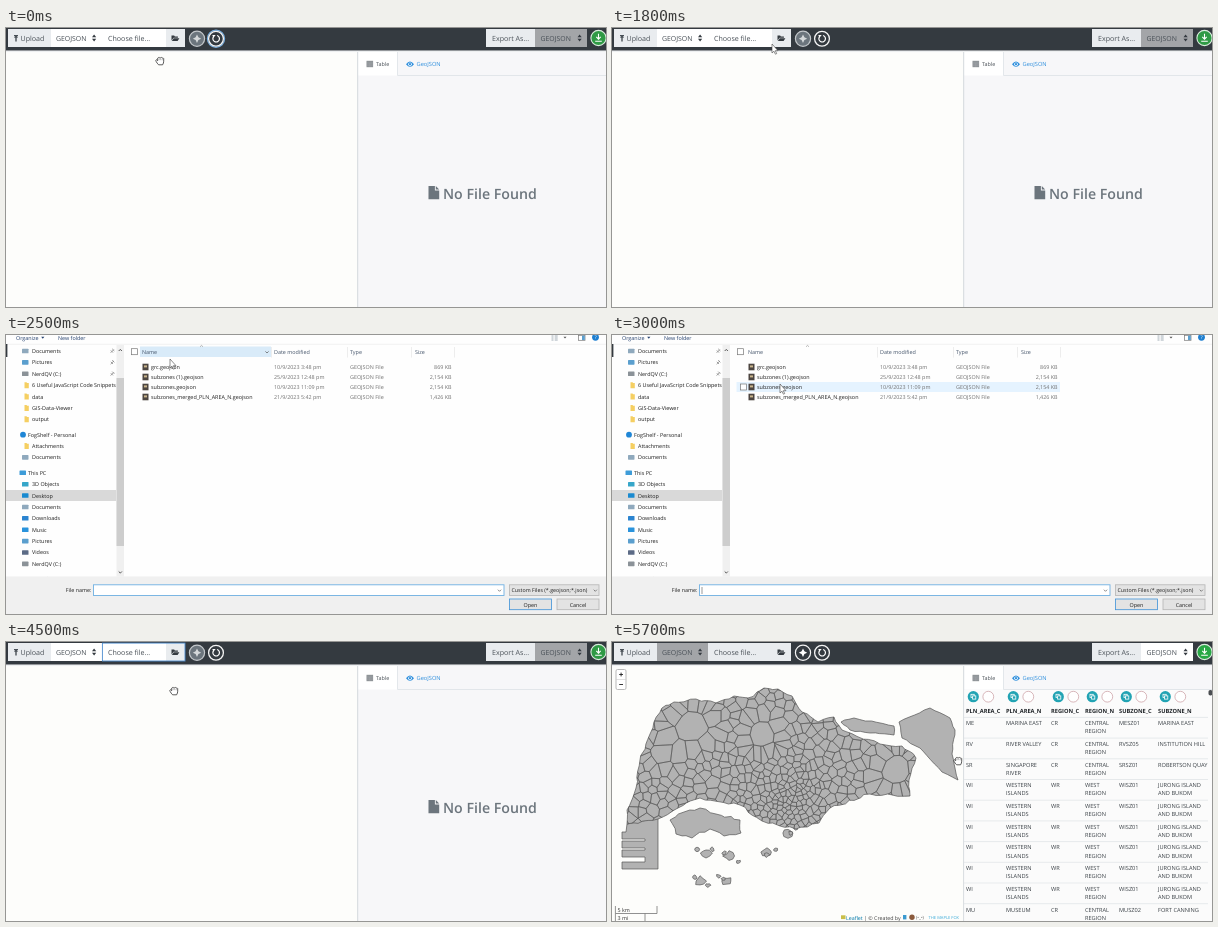
These frames come from a looping animation (600 px wide and 279 px high, 5.8 s). An HTML page:

```html
<!DOCTYPE html>
<html lang="en">
<head>
<meta charset="utf-8">
<title>GeoJSON viewer</title>
<style>
html, body { margin: 0; width: 100%; height: 100%; overflow: hidden; background: #fff; }
svg { display: block; width: 100vw; height: 100vh; }
text { font-family: "Open Sans", "Noto Sans", sans-serif; white-space: pre; text-rendering: geometricPrecision; }
</style>
</head>
<body>
<svg id="stage" viewBox="0 0 600 279" xmlns="http://www.w3.org/2000/svg"></svg>
<script>
const LOOP = 5800, STEP = 100;
const OPEN_AT = 2200, PICK_AT = 3200, CLOSE_AT = 3500, LOAD_AT = 5000;

const text = (x, y, s, size, fill = '#495057', more = '') =>
  `<text x="${x}" y="${y}" font-size="${size}" fill="${fill}" ${more}>${s}</text>`;
const rect = (x, y, w, h, fill, more = '') =>
  `<rect x="${x}" y="${y}" width="${w}" height="${h}" fill="${fill}" ${more}/>`;
const disc = (x, y, r, fill, more = '') =>
  `<circle cx="${x}" cy="${y}" r="${r}" fill="${fill}" ${more}/>`;
const path = (d, fill, more = '') => `<path d="${d}" fill="${fill}" ${more}/>`;
const line = (d, color, w = 1, more = '') => path(d, 'none', `stroke="${color}" stroke-width="${w}" ${more}`);
const group = (id, body) => `<g id="${id}">${body}</g>`;

// ---------- toolbar ----------
const carets = x => path(`M${x} 9.2l2.1 -2.6 2.1 2.6zM${x} 10.8l2.1 2.6 2.1 -2.6z`, '#343a40');

function toolbar() {
  return rect(0, 0, 600, 22.5, '#343a40') +
    rect(2, 1, 43, 18, '#e9ecef') +
    path('M8 7h4v1.2h-4zM10 7.2l2 2.6h-1.3v3.6h-1.4v-3.6h-1.3z', '#495057') +
    text(14.5, 13, 'Upload', 7.1) +
    rect(45, 1, 51, 18, '#fff', 'id="inType"') + text(50, 13, 'GEOJSON', 6.9) + carets(86) +
    rect(96, 1, 64, 18, '#fff', 'id="inFile"') + text(102, 13, 'Choose file...', 7.1) +
    rect(160, 1, 19, 18, '#e9ecef') +
    path('M165.5 12.5v-5h2.6l.8 .9h3v1.4h-4.3zM165.8 13l2-2.8h5.6l-1.8 2.8z', '#343a40') +
    rect(96.4, 1.1, 82.6, 17.9, 'none', 'id="focus" stroke="#4f8fd0" stroke-width=".9"') +
    disc(191, 10.7, 7.6, '#6c757d', 'id="compass" stroke="#c3c7ca" stroke-width="1.2"') +
    path('M191 6.5l1.4 2.8 2.8 1.4-2.8 1.4-1.4 2.8-1.4-2.8-2.8-1.4 2.8-1.4z', '#d5d8da', 'id="needle"') +
    disc(210, 10.7, 8.6, 'none', 'id="glow" stroke="#77aee0" stroke-width="1.2"') +
    disc(210, 10.7, 7.4, '#343a40', 'stroke="#f4f4f4" stroke-width="1.3"') +
    line('M207.6 8.6a3.3 3.3 0 1 0 3.4-1.1', '#fff', 1.2) + path('M206.3 6.9l3.4 .1-2.3 2.7z', '#fff') +
    rect(480, 1, 49, 18, '#e9ecef') + text(486, 13, 'Export As...', 7.1) +
    rect(529, 1, 52, 18, '#a3a5a8', 'id="outType"') + text(534.5, 13, 'GEOJSON', 6.9) + carets(571.5) +
    disc(592.5, 10, 7.6, '#2f9a45', 'id="save" stroke="#d8ecdc" stroke-width="1.1"') +
    line('M592.5 5.8v5M590.3 8.8l2.2 2.3 2.2-2.3M589.2 13.3h6.6', '#fff', 1.1);
}

function panels() {
  return rect(0, 22.5, 600, 256.5, '#fdfdfb') + rect(0, 22.5, 600, 1.6, '#eef0f1') +
    rect(352, 24, 248, 255, '#f7f7f9') + rect(352, 24, 39.5, 23.5, '#fff') +
    line('M351.7 24V279', '#d3d8dc') + line('M391.5 24V47.5H600', '#dee2e6', .8) +
    rect(360.5, 32.8, 6.6, 6.4, '#8f9498') + line('M360.5 35h6.6M360.5 37.1h6.6M363.8 35v4', '#a9adb0', .4) +
    text(370, 38.2, 'Table', 5.4) +
    path('M400 36.2q4-5.2 8 0q-4 5.2-8 0z', '#2f8fdd') + disc(404, 36.2, 1.8, '#fff') + disc(404, 36.2, 1.1, '#2f8fdd') +
    text(410.5, 38.2, 'GeoJSON', 5.7, '#2f8fdd');
}

const emptyNote = () =>
  path('M422.5 158h6.4v4.4h4.3v8.8h-10.7zM429.8 158l3.4 3.5h-3.4z', '#6c757d') +
  text(437, 171, 'No File Found', 14.2, '#6c757d', 'font-weight="600"');

// ---------- file dialog ----------
const INK = '#1e1e1e', DIM = '#707070', FS = 5.4;
const ROW_TOP = 27, ROW_H = 10;

// sections of the tree; a leading * marks a section root
const tree = [
  ['Documents', 'Pictures', 'NerdQV (C:)', '6 Useful JavaScript Code Snippets', 'data', 'GIS-Data-Viewer', 'output'],
  ['*FogShelf - Personal', 'Attachments', 'Documents'],
  ['*This PC', '3D Objects', 'Desktop', 'Documents', 'Downloads', 'Music', 'Pictures', 'Videos', 'NerdQV (C:)'],
  ['*Network']
];
const icons = {
  Documents: '#8fa9bd', Pictures: '#5b9fce', 'NerdQV (C:)': '#8b9298', 'This PC': '#3e9cd8', Network: '#3e9cd8',
  '3D Objects': '#36a6c9', Desktop: '#1a8ad0', Downloads: '#2b84d0', Music: '#2a93dc', Videos: '#5c6b86'
};
const files = [
  ['grc.geojson', '10/9/2023 3:48 pm', '869 KB'],
  ['subzones (1).geojson', '25/9/2023 12:48 pm', '2,154 KB'],
  ['subzones.geojson', '10/9/2023 11:09 pm', '2,154 KB'],
  ['subzones_merged_PLN_AREA_N.geojson', '21/9/2023 5:42 pm', '1,426 KB']
];

function treeItem(item, y) {
  const root = item[0] === '*', label = item.replace('*', ''), x = root ? 13.5 : 16, color = icons[label];
  const icon = color ? rect(x, y - 2.3, 6.5, 4.6, color, 'rx=".6"')
    : root ? disc(x + 3.5, y, 2.9, '#1f86d6')
    : path(`M18.5 ${y - 3}h2l.7 .8h1.6v5.2h-4.3z`, '#f5cf62');
  return icon + text(root ? 22 : 26, y + 2, label, FS, INK);
}

function treePane() {
  let n = 0;
  const items = tree.map((section, s) => section.map(item => treeItem(item, 16 + 11.38 * n++ + 4 * s)).join(''));
  const pins = [0, 1, 2].map(i => line(`M104.6 ${17.8 + 11.4 * i}l3.2-3.2m-1.6-.8l2.2 2.2m-3.6-.6l2.2 2.2`, '#777', .7));
  return rect(0, 155, 110, 11, '#d9d9d9') + items.join('') + pins.join('') +
    rect(110.5, 10, 7.5, 231.5, '#f0f0f0') + rect(110.5, 43, 7.5, 168, '#cdcdcd') +
    line('M112.7 16l1.6-1.6 1.6 1.6M112.7 236.5l1.6 1.6 1.6-1.6', '#444', .9);
}

const fileRow = ([name, date, size], i) => {
  const y = ROW_TOP + ROW_H * i + 5;
  return rect(136.5, y - 3.3, 6, 6.6, '#4c4540') + rect(138, y - 1.6, 3, 2, '#c8b48c') +
    text(145, y + 1.8, name, FS, INK) + text(268, y + 1.8, date, FS, DIM) +
    text(344, y + 1.8, 'GEOJSON File', FS, DIM) + text(445.5, y + 1.8, size, FS, DIM, 'text-anchor="end"');
};

const chevron = (x, y) => line(`M${x - 1.6} ${y - .8}l1.6 1.6 1.6-1.6`, '#555', .7);
const checkbox = (x, y) => rect(x, y, 6, 6, '#fff', 'stroke="#777" stroke-width=".7"');
const button = (x, label, edge) => rect(x, 264, 42, 10.7, '#e3e3e3', `stroke="${edge}" stroke-width=".8"`) +
  text(x + 21, 271.5, label, FS, INK, 'text-anchor="middle"');

function dialog() {
  return rect(0, 0, 600, 279, '#fefefe') + line('M0 9.3H600', '#ececec', .7) +
    rect(0, 9, 1.4, 13, '#343a40') +
    text(10, 4.8, 'Organize', FS, '#24406e') + path('M35.2 1.8h3.2l-1.6 1.9z', '#24406e') +
    text(52, 4.8, 'New folder', FS, '#24406e') +
    line('M545.5 1h2m1.2 0h3M545.5 3h2m1.2 0h3M545.5 5h2m1.2 0h3', '#8a97a3', .8) + path('M557.5 1.8h3l-1.5 1.8z', '#555') +
    rect(572.5, .3, 6.5, 5, '#fff', 'stroke="#777" stroke-width=".7"') + rect(576, .6, 2.8, 4.4, '#5b9fce') +
    disc(589.5, 2.3, 3.4, '#1e7fd0') + text(589.5, 4.3, '?', 5, '#fff', 'text-anchor="middle"') +
    treePane() +
    rect(134, 11.5, 131, 10.5, '#d9ebf9', 'id="headHover"') +
    rect(124.5, 47, 323.5, ROW_H, '#e5f3ff', 'id="rowHover"') +
    checkbox(125.5, 13.7) + group('rowCheck', checkbox(128.5, 49)) +
    line('M265.5 12V22.5M341.5 12V22.5M405.5 12V22.5M448.5 12V22.5', '#e6e6e6', .7) +
    line('M194 11.8l1.5-1.4 1.5 1.4', '#888', .6) + group('headChevron', chevron(261, 17.2)) +
    [['Name', 136], ['Date modified', 268], ['Type', 344], ['Size', 409]]
      .map(([s, x]) => text(x, 18.8, s, FS, '#44546a')).join('') +
    files.map(fileRow).join('') +
    rect(0, 241.5, 600, 37.5, '#f0f0f0') +
    text(85.5, 257.3, 'File name:', FS, INK, 'text-anchor="end"') +
    rect(87.5, 249.8, 410.5, 10.7, '#fff', 'stroke="#6fb0e2" stroke-width=".9"') + chevron(493.5, 255.5) +
    text(90, 257.3, 'subzones.geojson', FS, INK, 'id="picked"') + line('M90 252V259', '#333', .5, 'id="caret"') +
    rect(503.5, 249.8, 89.5, 10.7, '#e3e3e3', 'stroke="#b5b5b5" stroke-width=".8"') +
    text(505.5, 257.3, 'Custom Files (*.geojson;*.json)', 5.3, INK) + chevron(589.3, 255.5) +
    button(503.5, 'Open', '#3f92d8') + button(551, 'Cancel', '#b5b5b5');
}

// ---------- map ----------
let seed = 29;
const rnd = () => (seed = (seed * 16807) % 2147483647) / 2147483647;
const wobble = a => (rnd() - .5) * 2 * a;
const join = pts => 'M' + pts.map(p => p.map(n => n.toFixed(1)).join(' ')).join('L') + 'Z';

// roughens the straight edges between a few key points
function coast(keys, rough = 1.3) {
  const pts = keys.split(' ').map(p => p.split(',').map(Number));
  return join(pts.flatMap(([x, y], i) => {
    const [u, v] = pts[(i + 1) % pts.length], n = Math.ceil(Math.hypot(u - x, v - y) / 6);
    return Array.from({ length: n }, (_, k) =>
      [x + (u - x) * k / n + (k && wobble(rough)), y + (v - y) * k / n + (k && wobble(rough))]);
  }));
}

const blob = (x, y, r) => join(Array.from({ length: 8 }, (_, i) => {
  const a = i * Math.PI / 4, d = r * (.6 + rnd() * .7);
  return [x + d * 1.2 * Math.cos(a), y + d * Math.sin(a)];
}));

const mainland = '28,118 38,92 50,66 62,60 84,57 104,61 122,54 136,56 152,46 166,47 180,54 190,70 206,80 222,75 ' +
  '230,88 268,102 290,104 304,116 297,138 298,154 258,152 218,166 207,181 184,187 150,179 128,163 88,156 66,166 46,177 15,182 15,168 24,146';
const jurong = '72,170 88,166 104,172 128,178 129,191 112,194 98,187 80,196 64,192 58,178';
const tekong = '287,80 318,66 338,76 343,88 340,112 346,138 330,130 308,106 290,96';
const ubin = '229,80 242,76 282,84 282,93 258,91 238,88';

// a block of land with three docks cut into its western side
const docks = 'M15 182L46 176V227H10V220' + [213, 204, 195].map(y => `H33V${y + 2}H10V${y - 5}`).join('') + 'H14Z';

function islets() {
  const groups = [[94, 211], [117, 214], [88, 239], [115, 239], [155, 210], [176, 191]];
  return groups.flatMap(([x, y]) => [blob(x, y, 4.2), ...[1, 2].map(() => blob(x + wobble(12), y + wobble(6), 2))]);
}

// spacing shrinks towards the city centre; a few districts stay large
function districtSeeds() {
  const list = [[80, 84, 38], [50, 112, 24], [150, 92, 30], [284, 128, 34]];
  for (let i = 0; i < 7000; i++) {
    const x = 8 + rnd() * 302, y = 42 + rnd() * 150;
    const r = Math.min(8, 2.4 + Math.hypot(x - 176, y - 164) * .075) * (.65 + rnd() * .8);
    if (list.every(s => Math.hypot(x - s[0], y - s[1]) > Math.max(r, s[2] * .72))) list.push([x, y, r]);
  }
  return list;
}

// keeps the part of a polygon that is nearer to a than to b
function clip(pts, a, b) {
  const mx = (a[0] + b[0]) / 2, my = (a[1] + b[1]) / 2;
  const side = p => (p[0] - mx) * (b[0] - a[0]) + (p[1] - my) * (b[1] - a[1]);
  return pts.flatMap((p, i) => {
    const q = pts[(i + 1) % pts.length], u = side(p), v = side(q), k = u / (u - v);
    const kept = u <= 0 ? [p] : [];
    return u * v < 0 ? [...kept, [p[0] + (q[0] - p[0]) * k, p[1] + (q[1] - p[1]) * k]] : kept;
  });
}

function districts() {
  const seeds = districtSeeds();
  return seeds.map(a => {
    const [x, y] = a;
    const box = [[x - 36, y - 36], [x + 36, y - 36], [x + 36, y + 36], [x - 36, y + 36]];
    return join(seeds.filter(b => b !== a && Math.hypot(b[0] - x, b[1] - y) < 72).reduce((cell, b) => clip(cell, a, b), box));
  }).join('');
}

function map() {
  const land = d => path(d, '#b2b2b2', 'stroke="#555" stroke-width=".7" stroke-linejoin="round"');
  const shore = coast(mainland);
  return `<clipPath id="shore"><path d="${shore}"/></clipPath>` +
    [docks, coast(jurong), coast(tekong, .6), coast(ubin, .8), ...islets(), shore].map(land).join('') +
    line(districts(), '#555', .55, 'clip-path="url(#shore)"') +
    rect(4, 27.5, 10, 20, '#fff', 'rx="1.5" stroke="#b9b9b9" stroke-width="1"') + line('M4 37.5H14', '#ccc', .6) +
    line('M7.2 32.5h3.8M9.1 30.6v3.8M7.2 42.5h3.8', '#222', .9) +
    line('M3.4 264V271.5H45V264M3.4 271.5V279M33 271.5V279', '#777', .8) +
    text(5.5, 269.8, '5 km', 5.4, '#333') + text(5.5, 278, '3 mi', 5.4, '#333') +
    rect(229, 273.3, 4.5, 3.8, '#c9bf4a') + text(234, 277.6, 'Leaflet', 5.3, '#0078a8') +
    text(252, 277.6, '| © Created by', 5.3, '#444') + rect(291, 273, 3.4, 4.4, '#3b9ad0') +
    disc(300, 275.3, 2.7, '#8a5a3c') + text(304, 277.3, '(•_•)', 4.4, '#555') +
    text(316.5, 277.3, 'THE MAPLE FOX', 4.1, '#35a9d8');
}

// ---------- table ----------
const cols = [['PLN_AREA_C', 354], ['PLN_AREA_N', 394], ['REGION_C', 439], ['REGION_N', 473], ['SUBZONE_C', 507], ['SUBZONE_N', 546]];
const records = [
  'ME|MARINA EAST|CR|CENTRAL/REGION|MESZ01|MARINA EAST',
  'RV|RIVER VALLEY|CR|CENTRAL/REGION|RVSZ05|INSTITUTION HILL',
  'SR|SINGAPORE/RIVER|CR|CENTRAL/REGION|SRSZ01|ROBERTSON QUAY',
  ...Array(6).fill('WI|WESTERN/ISLANDS|WR|WEST/REGION|WISZ01|JURONG ISLAND/AND BUKOM'),
  'MU|MUSEUM|CR|CENTRAL/REGION|MUSZ02|FORT CANNING'
];

function table() {
  const head = cols.map(([name, x]) =>
    disc(x + 7.3, 54.7, 5.6, '#22a3b3') +
    rect(x + 5, 52.3, 3.2, 3.2, 'none', 'stroke="#fff" stroke-width=".8"') +
    rect(x + 6.6, 53.9, 3.2, 3.2, '#22a3b3', 'stroke="#fff" stroke-width=".8"') +
    disc(x + 22.3, 54.7, 5.4, '#fff', 'stroke="#cfa5aa" stroke-width=".8"') +
    text(x, 71, name, 5.7, '#212529', 'font-weight="700"')).join('');
  const body = records.map((rec, i) => {
    const y = 83.2 + i * 20.7;
    return line(`M352 ${y - 7.8}H596`, '#dee2e6', .7) + rec.split('|').map((cell, c) =>
      cell.split('/').map((s, k) => text(cols[c][1], y + k * 8.1, s, 5.65, '#3a4046')).join('')).join('');
  }).join('');
  return rect(352.3, 48, 247.7, 231, '#fbfbfb') + head + body + rect(596.5, 48, 4, 5.5, '#4a4d50', 'rx="1.8"');
}

// ---------- pointer ----------
const arrow = path('M0 0V9L2 7.2L3.4 10.2L4.7 9.6L3.3 6.7H6Z', '#fff', 'stroke="#444" stroke-width=".6"');
const hand = path('M-3.9 .4q-.8-1.4 .4-1.7l1.2 1v-2.6q.7-1.1 1.5-.2q.7-1.2 1.5 0q.8-1 1.5 .2q1-.7 1.5 .5v2.6q0 1.8-1.1 3.6h-4q-1.6-1.6-2.5-3.4z', '#fff', 'stroke="#333" stroke-width=".8" stroke-linejoin="round"') +
  line('M-.8-2.4v1.6M.7-2.4v1.6M2.2-2.2v1.5', '#555', .4);

const home = [154, 33];
const moves = [
  { from: 400, to: 1200, at: [160, 16] },
  { from: 1800, to: OPEN_AT, at: [164, 24] },
  { from: 2500, to: 3000, at: [168, 49] },
  { from: LOAD_AT, to: 5600, at: [346, 119] }
];
const ease = k => k * k * (3 - 2 * k);

const pointerAt = t => moves.reduce(([x, y], { from, to, at }) => {
  const k = ease(Math.min(1, Math.max(0, (t - from) / (to - from))));
  return [x + (at[0] - x) * k, y + (at[1] - y) * k];
}, home);

document.getElementById('stage').innerHTML =
  group('app', panels() + group('empty', emptyNote()) + group('loaded', map() + table()) + toolbar()) +
  group('dialog', dialog()) + group('pointer', group('arrow', arrow) + group('hand', hand));

const el = id => document.getElementById(id);
const show = (id, on) => { el(id).style.display = on ? '' : 'none'; };
const fill = (id, color) => el(id).setAttribute('fill', color);

function render(t) {
  const [x, y] = pointerAt(t);
  const picking = t >= OPEN_AT && t < CLOSE_AT, loaded = t >= LOAD_AT, picked = t >= PICK_AT;
  show('app', !picking);
  show('dialog', picking);
  show('empty', !loaded);
  show('loaded', loaded);
  show('focus', t >= CLOSE_AT && !loaded);
  show('glow', t < 1000);
  fill('inType', loaded ? '#a3a5a8' : '#fff');
  fill('inFile', loaded ? '#e9ecef' : '#fff');
  fill('outType', loaded ? '#fff' : '#a3a5a8');
  fill('compass', loaded ? '#343a40' : '#6c757d');
  el('compass').setAttribute('stroke', loaded ? '#f4f4f4' : '#c3c7ca');
  fill('needle', loaded ? '#fff' : '#d5d8da');
  fill('save', loaded ? '#28a745' : '#2f9a45');

  const row = Math.floor((y - ROW_TOP) / ROW_H);
  show('headHover', row < 0);
  show('headChevron', row < 0);
  show('rowHover', row >= 0);
  show('rowCheck', row >= 0);
  el('rowHover').setAttribute('y', ROW_TOP + row * ROW_H);
  el('rowCheck').setAttribute('transform', `translate(0 ${(row - 2) * ROW_H})`);
  fill('rowHover', picked ? '#cce8ff' : '#e5f3ff');
  show('picked', picked);
  show('caret', !picked && t >= 2700);

  const grabbing = !picking && y > 23;
  show('hand', grabbing);
  show('arrow', !grabbing);
  el('pointer').setAttribute('transform', `translate(${x.toFixed(1)} ${y.toFixed(1)})`);
}

const start = performance.now();
function tick() {
  const t = (performance.now() - start) % LOOP;
  render(Math.floor(t / STEP) * STEP);
  requestAnimationFrame(tick);
}
tick();
</script>
</body>
</html>
```
